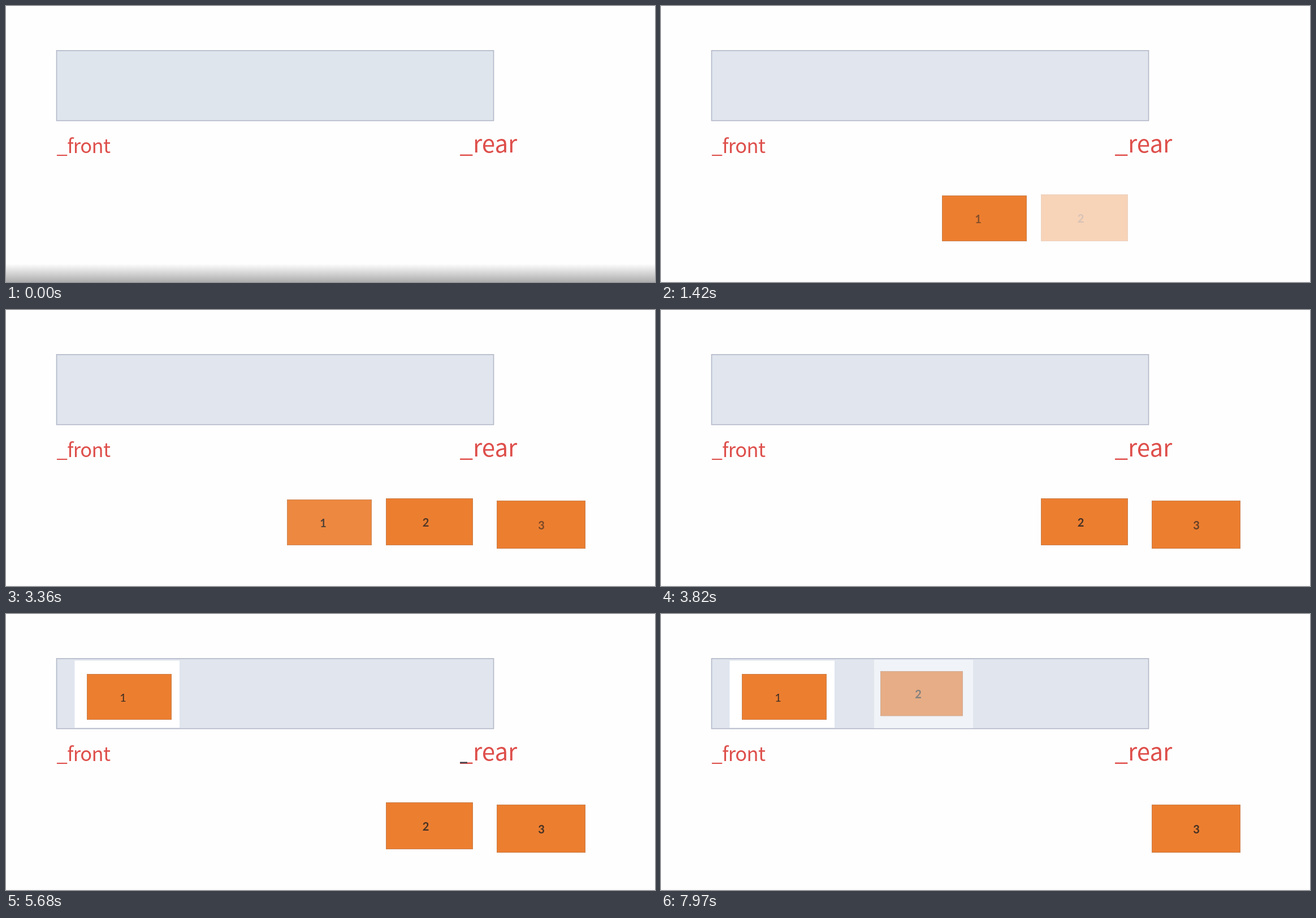
Write an HTML page that moves like this. It is 1148 px wide and 488 px high and loops after 8 s.

```html
<!DOCTYPE html>
<html lang="en">
<head>
<meta charset="utf-8">
<title>Queue</title>
<style>
  html, body { margin: 0; width: 100%; height: 100%; overflow: hidden; background: #fefefe; }
  svg { display: block; width: 100%; height: 100%; }
  .name { font-family: "Noto Sans CJK SC", "Noto Sans CJK JP", "Noto Sans CJK", "Noto Sans", sans-serif; fill: #de4f4b; }
  .digit { font-family: Lato, "Open Sans", sans-serif; font-size: 20px; fill: #2a2522; text-anchor: middle; }
</style>
</head>
<body>
<svg viewBox="0 0 1148 488" preserveAspectRatio="none">
  <defs>
    <linearGradient id="shade" x2="0" y2="1">
      <stop offset="0" stop-color="#fefefe"/>
      <stop offset=".35" stop-color="#e2e2e2"/>
      <stop offset="1" stop-color="#aeaeae"/>
    </linearGradient>
  </defs>
  <rect y="486" width="1148" height="2" fill="#fafafa"/>
  <rect id="foot" y="456" width="1148" height="32" fill="url(#shade)"/>
  <rect id="bar" x="89.5" y="78.8" width="773" height="123.9" fill="#e0e5ee" stroke="#b3b8c8" stroke-width="1.6"/>
  <g id="cells"></g>
  <text class="name" x="89.5" y="259.5" font-size="34.5" letter-spacing="-.6">_front</text>
  <text class="name" x="802.5" y="258.5" font-size="42">_rear</text>
  <rect id="mark" x="803" y="261.5" width="13" height="2.5" fill="#46414a"/>
</svg>
<script>
const LOOP = 8000, FADE = 500;
const $ = id => document.getElementById(id);

// box: x, y, w, h; at: digit centre x and baseline; pad: white panel behind
const cells = [
  { label: 1, box: [497.5, 335.5, 149, 80], at: [561, 384], start: 530, end: 3320, weight: 700 },
  { label: 2, box: [672.5, 333.5, 153, 82], at: [742.5, 383], start: 1255, end: 6890, weight: 700 },
  { label: 3, box: [868.5, 337.5, 156, 84], at: [947, 388], start: 2215, weight: 700 },
  { label: 1, box: [143.5, 106.5, 149, 80], at: [207, 154.5], start: 4420, weight: 400, pad: [121.5, 82.5, 185.5, 118.5] },
  { label: 2, box: [388.5, 101.5, 145, 78.5], at: [455, 149], start: 7700, weight: 700, pad: [377, 81, 175, 121] }
];

function add(parent, tag, attrs) {
  const el = document.createElementNS("http://www.w3.org/2000/svg", tag);
  for (const k in attrs) el.setAttribute(k, attrs[k]);
  return parent.appendChild(el);
}
const rect = (parent, [x, y, width, height], style) =>
  add(parent, "rect", { x, y, width, height, ...style });

for (const c of cells) {
  c.el = add($("cells"), "g", {});
  if (c.pad) rect(c.el, c.pad, { fill: "#fff" });
  rect(c.el, c.box, { fill: "#ec7e30", stroke: "#c97f4c", "stroke-width": 1 });
  c.text = add(c.el, "text", { class: "digit", x: c.at[0], y: c.at[1], "font-weight": c.weight });
  c.text.textContent = c.label;
}

const ramp = (t, from, length) => Math.min(1, Math.max(0, (t - from) / length));

function draw(t) {
  for (const c of cells) {
    const out = c.end ? ramp(t, c.end, FADE) : 0;
    c.el.setAttribute("opacity", t < 550 ? 0 : ramp(t, c.start, FADE) * (1 - out));
    // digits keep darkening after the box is solid
    c.text.setAttribute("opacity", c.pad ? .9 : .5 + .35 * ramp(t, c.start + 800, 1600));
  }
  const clear = ramp(t, 550, 770);
  $("foot").setAttribute("opacity", 1 - clear);
  $("bar").setAttribute("fill", `rgb(${222 + 2 * clear}, 229, ${237 + clear})`);
  $("mark").setAttribute("opacity", t >= 5680 && t < 6930 ? 1 : 0);
}

const begin = performance.now();
function tick(now) {
  draw(Math.max(0, now - begin) % LOOP);
  requestAnimationFrame(tick);
}
draw(0);
requestAnimationFrame(tick);
</script>
</body>
</html>
```
